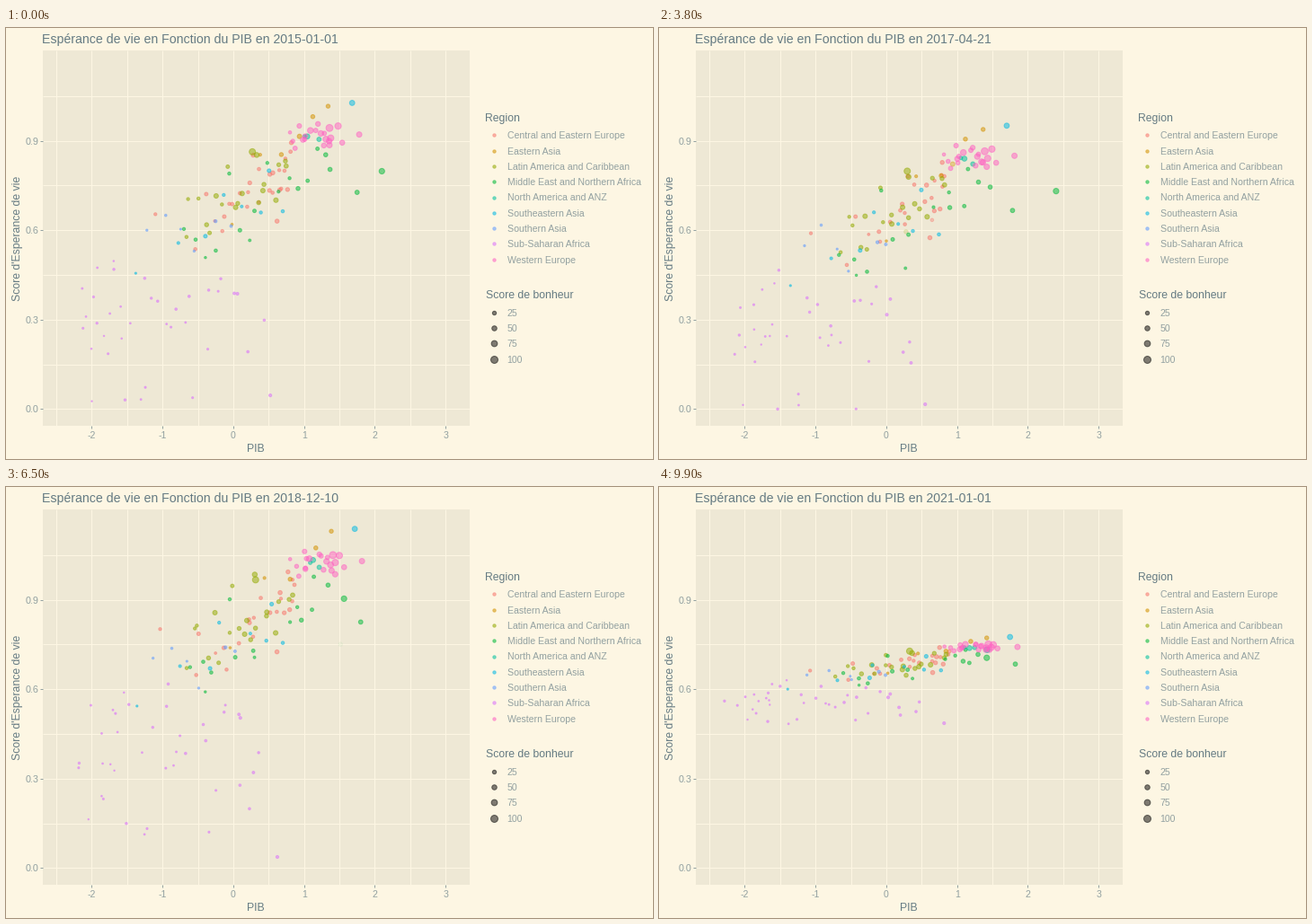
A matplotlib script that plays this animation: 720 by 480 pixels, repeating every 10000 ms.

```python
import matplotlib.pyplot as plt
import numpy as np
from matplotlib.animation import FuncAnimation
from matplotlib.colors import to_rgba
from matplotlib.patches import Rectangle

W, H, FRAMES, YEARS = 720, 480, 100, 6
L, R, T, B = 41, 516, 25, 443          # panel edges in pixels
PAPER, PANEL, INK, SOFT = "#fdf6e3", "#eee8d5", "#657b83", "#93a1a1"
PX = 0.72                              # points per pixel at 100 dpi

plt.rcParams["font.family"] = ["Liberation Sans", "DejaVu Sans"]
rng = np.random.default_rng(12)

# name: colour, dots, PIB from, to, skew, score from, to, spread, radius
REGIONS = {
    "Central and Eastern Europe": ("#F8766D", 28, -1.1, 0.85, 0.4, 0.60, 0.78, 0.07, 2.1),
    "Eastern Asia": ("#D39200", 5, -0.05, 1.1, 0.6, 0.68, 0.97, 0.04, 2.3),
    "Latin America and Caribbean": ("#93AA00", 20, -0.65, 0.75, 0.9, 0.64, 0.80, 0.06, 2.6),
    "Middle East and Northern Africa": ("#00BA38", 16, -0.7, 1.4, 0.9, 0.60, 0.81, 0.07, 2.1),
    "North America and ANZ": ("#00C19F", 4, 0.99, 1.36, 1.5, 0.93, 0.88, 0.02, 3.3),
    "Southeastern Asia": ("#00B9E3", 8, -1.4, 0.7, 0.6, 0.50, 0.73, 0.05, 2.1),
    "Southern Asia": ("#619CFF", 6, -1.2, 0.0, 1.0, 0.56, 0.66, 0.05, 1.6),
    "Sub-Saharan Africa": ("#DB72FB", 40, -2.1, 0.5, 1.5, 0.26, 0.28, 0.13, 1.5),
    "Western Europe": ("#FF61C3", 19, 0.77, 1.5, 0.8, 0.90, 0.92, 0.025, 3.2),
}
# Stand-alone dots: region initials, PIB, score, radius
NOTABLE = [
    ("Southeastern", 1.68, 1.027, 3.2), ("Eastern", 1.34, 1.016, 2.5),
    ("Western", 1.78, 0.921, 3.3), ("Western", 1.36, 0.943, 4.2),
    ("Latin", 0.27, 0.863, 3.8), ("Middle", 1.75, 0.727, 2.7),
    ("Middle", 2.10, 0.798, 3.4),
]
LEAP = [3.04, 1.47, 1.50, 1.42]        # the last dot's PIB from the fourth year on

# Every score s becomes gain * s + lift at each new year
GAIN = np.array([1, 0.925, 0.93, 1, 1.03, 0.29, 0.30])
LIFT = np.array([0, -0.03, -0.025, -0.03, 0.09, 0.46, 0.467])


def px(pib):
    return 252.9 + 78.75 * pib


def py(score):
    return 424.4 - 332 * score


def crowd(color, n, x0, x1, skew, s0, s1, spread, r):
    """Dots strewn along one region's trend: colour, PIB, score, radius, spread."""
    u = np.linspace(0, 1, n) ** skew
    x = x0 + (x1 - x0) * u + rng.normal(0, 0.04, n)
    s = s0 + (s1 - s0) * u + spread * rng.normal(0, 1, n).clip(-1.8, 1.8)
    size = r * (0.8 + 0.3 * u + rng.uniform(-0.15, 0.2, n))
    return [(color, *dot, spread) for dot in zip(x, s, size)]


dots = [dot for spec in REGIONS.values() for dot in crowd(*spec)]
for start, x, s, r in NOTABLE:
    spec = next(v for k, v in REGIONS.items() if k.startswith(start))
    dots.append((spec[0], x, s, r, 0.01))
hues, pib, score, radius, spread = map(np.array, zip(*dots))
N = len(dots)

# Yearly positions: shared trend plus a small random walk per dot
walk = rng.normal(0, 1, (2, N, YEARS + 1)) * spread[:, None]
walk[:, :, 0] = 0
xs = pib[:, None] + 0.012 * np.arange(YEARS + 1) + 0.5 * walk[0].cumsum(axis=1)
xs[-1, 3:] = LEAP
ss = np.maximum(0, GAIN * (score[:, None] + 0.3 * walk[1]) + LIFT)

# A few dots fade in or out over a year
born, gone = np.full(N, -9.0), np.full(N, 99.0)
movers = rng.permutation(N - len(NOTABLE))[:14]
gone[movers[:9]] = np.arange(9) % 5
born[movers[9:]] = 1 + np.arange(5)


def area(r):
    return (2 * (np.asarray(r) - 0.3) * PX) ** 2


def place(t):
    """Dot positions and opacities at time t in years."""
    own = np.clip(t, np.maximum(born, 0), np.minimum(gone, YEARS))
    k = np.minimum(own.astype(int), YEARS - 1)
    f, row = own - k, np.arange(N)
    x, s = (a[row, k] * (1 - f) + a[row, k + 1] * f for a in (xs, ss))
    fade = np.clip(1 - np.maximum(born - t, t - gone), 0, 1)
    return np.column_stack([px(x), py(s)]), fade


fig = plt.figure(figsize=(W / 100, H / 100), dpi=100, facecolor=PAPER)
ax = fig.add_axes([0, 0, 1, 1])
ax.set(xlim=(0, W), ylim=(H, 0))
ax.axis("off")


def label(x, y, s, size, color=INK, **kw):
    return ax.text(x, y, s, fontsize=size * PX, color=color, va="baseline", **kw)


def line(x, y, color):
    ax.plot(x, y, color=color, lw=PX, solid_capstyle="butt", zorder=1)


def key(y, r, color, name):
    ax.scatter(543, y, s=area(r), c=color, alpha=0.5, lw=PX, edgecolors=color)
    label(557.5, y + 4, name, 10.55, SOFT)


ax.add_patch(Rectangle((L, T), R - L, B - T, color=PANEL, lw=0, zorder=0))
for k in np.arange(-2.5, 3.1, 0.5):
    x = px(k)
    line([x, x], [T, B], PAPER)
    if k == int(k):
        line([x, x], [B, B + 3], SOFT)
        label(x, 457, f"{int(k)}", 10.5, SOFT, ha="center")
for s in np.arange(0, 1.06, 0.15):
    y = py(s)
    line([L, R], [y, y], PAPER)
    if round(s / 0.15) % 2 == 0:
        line([L - 3, L], [y, y], SOFT)
        label(36, y + 4, f"{s:.1f}", 10.7, SOFT, ha="right")

title = label(40.5, 17, "", 14.15)
label(278, 472, "PIB", 12.2, ha="center")
label(16, 234, "Score d'Esperance de vie", 12.2, ha="center",
      rotation=90, rotation_mode="anchor")

label(533.5, 104, "Region", 12.3)
for i, (name, spec) in enumerate(REGIONS.items()):
    key(119.3 + 17.3 * i, 2, spec[0], name)
label(533.5, 301, "Score de bonheur", 12.3)
for i in range(4):
    key(316.8 + 17.3 * i, 2.5 + 0.6 * i, "k", f"{25 * (i + 1)}")

rgba = np.array([to_rgba(h, 0.5) for h in hues])
cloud = ax.scatter(np.zeros(N), np.zeros(N), s=area(radius), lw=PX, zorder=3)


def draw(i):
    pos, fade = place(i * YEARS / (FRAMES - 1))
    colors = rgba.copy()
    colors[:, 3] *= fade
    cloud.set_offsets(pos)
    cloud.set_facecolor(colors)
    cloud.set_edgecolor(colors)
    day = np.datetime64("2015-01-01") + 2192 * i // (FRAMES - 1)
    title.set_text(f"Espérance de vie en Fonction du PIB en {day}")
    return cloud, title


anim = FuncAnimation(fig, draw, frames=FRAMES, interval=100, repeat=True)
plt.show()
```
